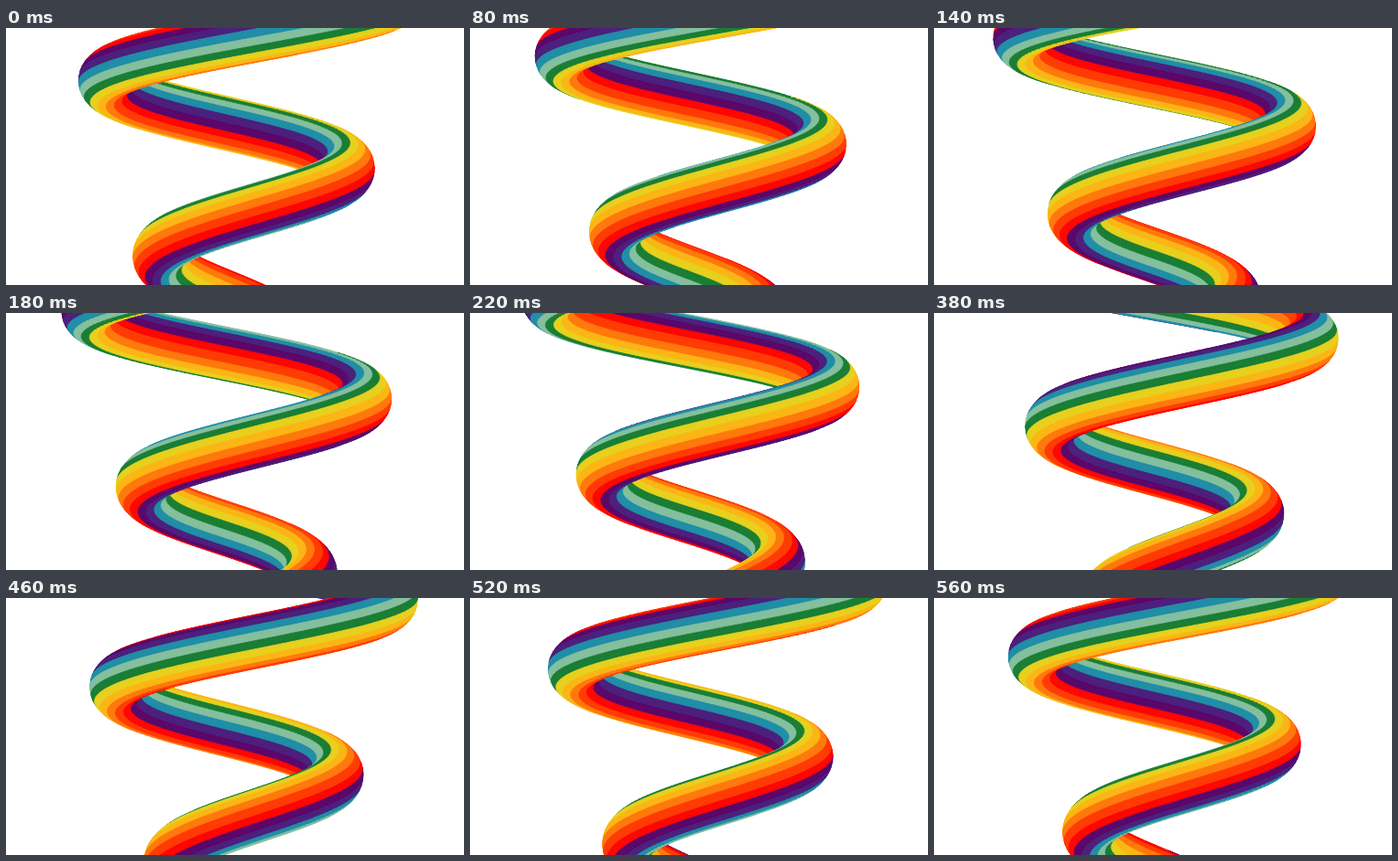
Animation of 500x281 px, one loop 0.58 s. Source, as an HTML page with a canvas:

```html
<!DOCTYPE html>
<html lang="en">
<head>
<meta charset="utf-8">
<title>Rainbow helix</title>
<style>
html, body { margin: 0; width: 100%; height: 100%; overflow: hidden; background: #fff; }
canvas { display: block; width: 500px; height: 281px; }
</style>
</head>
<body>
<canvas id="stage" width="500" height="281"></canvas>
<script>
const ctx = document.getElementById('stage').getContext('2d');
const W = 500, H = 281;
const LOOP = 580, STEP = 20;
const PITCH = 193, RISE = PITCH / (2 * Math.PI);
const CENTER = 255.6, TUBE = 29, TAPER = 0.308;
const FACETS = 40, SLICE = 0.06;
const COLORS = ['#fe0500', '#5a0669', '#4b1f7c', '#1f8da6', '#83bf9d',
                '#197d33', '#e7d01c', '#fbb514', '#ff780b', '#ff3a02'];

const coilRadius = y => 165.3 - TAPER * y;

// Stripe number that faces away from the axis: half a roll per turn,
// plus a twist that grows with the length of the tube.
const outerStripe = (angle, r) => 15.53 - 3.53e-4 * r * r - 5 * angle / Math.PI;

// One cross-section of the tube, its points following the stripes.
function ring(angle, top) {
  const y = top + RISE * angle, r = coilRadius(y);
  const cos = Math.cos(angle), sin = Math.sin(angle), len = Math.hypot(r, RISE);
  const offset = outerStripe(angle, r);
  const points = [];
  for (let j = 0; j <= FACETS; j++) {
    const a = (j * 20 / FACETS - offset) * Math.PI / 10;
    const out = TUBE * Math.cos(a), down = TUBE * Math.sin(a) / len;
    points.push([CENTER + (r + out) * cos + down * RISE * sin, y + down * r]);
  }
  return { z: r * sin, points };
}

function drawSlice([a, b]) {
  for (let j = 0; j < FACETS; j++) {
    const p = a.points[j], q = b.points[j], s = b.points[j + 1], t = a.points[j + 1];
    const facing = (s[0] - p[0]) * (t[1] - q[1]) - (s[1] - p[1]) * (t[0] - q[0]);
    if (facing >= 0) continue;
    ctx.fillStyle = ctx.strokeStyle = COLORS[Math.floor(j * 20 / FACETS) % 10];
    ctx.beginPath();
    ctx.moveTo(...p);
    ctx.lineTo(...q);
    ctx.lineTo(...s);
    ctx.lineTo(...t);
    ctx.closePath();
    ctx.fill();
    ctx.stroke();
  }
}

function draw(time) {
  const top = 156 - PITCH * time / LOOP;
  const slices = [];
  let last = null;
  for (let angle = -8; angle < 12; angle += SLICE) {
    const y = top + RISE * angle;
    if (y < -45 || y > H + 45) continue;
    const next = ring(angle, top);
    if (last) slices.push([last, next]);
    last = next;
  }
  // Far slices first, so that near ones cover them.
  slices.sort((m, n) => m[0].z + m[1].z - n[0].z - n[1].z);
  ctx.fillStyle = '#fff';
  ctx.fillRect(0, 0, W, H);
  ctx.lineWidth = 0.8;
  ctx.lineJoin = 'round';
  slices.forEach(drawSlice);
}

const start = performance.now();
let shown = -1;
function frame() {
  const now = Math.max(0, performance.now() - start) % LOOP;
  const time = Math.floor(now / STEP) * STEP;
  if (time !== shown) draw(shown = time);
  requestAnimationFrame(frame);
}
frame();
</script>
</body>
</html>
```
